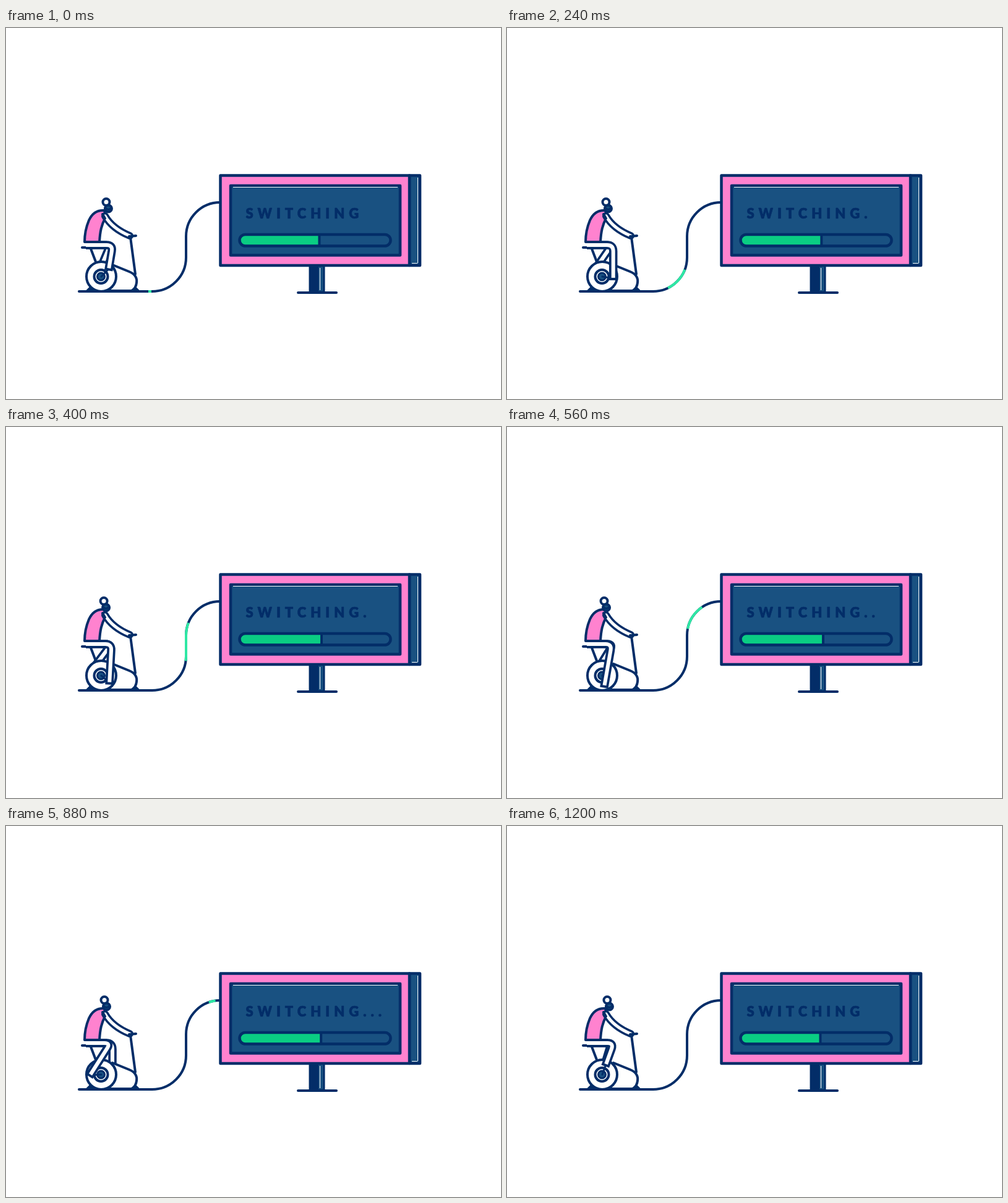
These frames come from a looping animation (800x600 px, 1.28 s). An HTML page:

```html
<!DOCTYPE html>
<html lang="en">
<head>
<meta charset="utf-8">
<title>Switching</title>
<style>
  html, body { margin: 0; width: 100%; height: 100%; overflow: hidden; }
  svg {
    --bg: #fff; --navy: #032d68; --deep: #195181; --pink: #ff82cf;
    display: block; width: 800px; height: 600px; background: var(--bg);
    fill: none; stroke: var(--navy); stroke-width: 4;
    stroke-linecap: round; stroke-linejoin: round;
  }
  svg.blue { --bg: #2e6ba9; }
  .bg { fill: var(--bg); }
  .deep { fill: var(--deep); }
  .pink { fill: var(--pink); }
  .navy { fill: var(--navy); }
  .limb { stroke-width: 13.5; }
  .skin { stroke: var(--bg); stroke-width: 6; }
  .arm { stroke-width: 12; }
  .arm + .skin { stroke-width: 5; }
  .flat { stroke-linecap: butt; }
  .board { stroke-width: 4.5; }
  .seam { stroke: var(--bg); stroke-width: 1; stroke-linecap: butt; }
  .blue .seam { opacity: .45; }
  text {
    font: 900 22px Lato, "Open Sans", sans-serif; letter-spacing: 7px;
    fill: var(--navy); stroke-width: .6;
  }
</style>
</head>
<body>
<svg id="stage" viewBox="0 0 800 600">
  <!-- cable -->
  <path d="M118 426H236A55 55 0 0 0 291 371V337A55 55 0 0 1 346 282"/>
  <path id="pulse" class="flat" stroke="#2ee8a4" d="M230 426H236A55 55 0 0 0 291 371V337A55 55 0 0 1 346 282"/>

  <!-- bike and rider -->
  <path d="M137 357L145 378"/>
  <g id="backLeg"><path class="limb flat"/><path class="skin flat"/></g>
  <path class="bg" d="M172 383L199 394C209 398 212 405 211 412Q210 421 203 425H144Z"/>
  <path d="M201 338L209 398"/>
  <circle class="bg" cx="154" cy="402" r="24"/>
  <path class="navy" stroke-width="2" d="M129 426L136 419L143 426ZM203 426L209 419L216 426Z"/>
  <circle class="bg" cx="153.5" cy="402" r="11"/>
  <circle class="deep" cx="153.5" cy="402" r="6" stroke-width="3"/>
  <path id="crank" stroke-width="3"/>
  <path d="M123 355H158"/>
  <g id="frontLeg"><path class="limb flat"/><path class="skin flat"/></g>
  <path class="pink" d="M159 295C147 294 139 300 134 311C129 323 127 336 127 346H151C152 329 154 319 161 306Z"/>
  <path class="arm" d="M160 304C168 318 183 329 200 336"/>
  <path class="skin" d="M160 304C168 318 183 329 200 336"/>
  <path d="M156 301L160 308M199 337L210 336"/>
  <g id="head">
    <circle class="bg" cx="162" cy="281.5" r="5.5"/>
    <circle class="deep" cx="165.5" cy="292" r="5.5"/>
    <path stroke-width="3" d="M160 291Q166 296 170 291"/>
  </g>

  <!-- billboard -->
  <path class="deep" d="M491 384H514V427H491Z" stroke-width="3"/>
  <path class="navy" stroke="none" d="M490 384H505V428H490Z"/>
  <path d="M472 428H534"/>
  <g class="board">
    <path class="deep" d="M652 238.500H669V384H652Z"/>
    <path class="pink" d="M346.500 238.500H652V384H346.500Z"/>
    <path class="deep" d="M363 255H637V367.500H363Z"/>
  </g>
  <path class="seam" d="M367 257.500H633M665.500 242V380M656 380.500H665M507.500 388V424"/>
  <text id="label" x="387.500" y="308">SWITCHING</text>
  <path id="fill" fill="#0acd83" stroke="none"/>
  <path id="edge" class="flat"/>
  <rect class="board" x="377.500" y="334" width="244" height="18.500" rx="9.250"/>
</svg>
<script>
const $ = id => document.getElementById(id);
const FRAME = 80, COUNT = 16, TURN = 2 * Math.PI;
const BLUE_STEP = 4;
const hub = [154, 402];
// [step, distance along the cable]
const tailKeys = [[0, 0], [2, 14], [3, 31], [4, 57], [5, 85], [7, 137], [9, 170], [11, 194], [14, 213], [16, 213]];
const tipKeys = [[0, 5], [2, 38], [3, 72], [4, 116], [5, 147], [7, 180], [9, 196], [11, 205], [14, 213], [16, 213]];

function sample(keys, k) {
  const i = keys.findIndex(p => p[0] > k);
  const [a, va] = keys[i - 1], [b, vb] = keys[i];
  return va + (vb - va) * (k - a) / (b - a);
}

function pedal(angle) {
  return [hub[0] + 18 * Math.cos(angle), hub[1] + 17 * Math.sin(angle)];
}

function drawLeg(leg, angle) {
  const [fx, fy] = pedal(angle);
  const kx = 170.5 + 1.5 * Math.cos(angle) - 1.5 * Math.sin(angle), ky = 351;
  const len = Math.hypot(fx - kx, fy - ky);
  const shin = d => `${kx + (fx - kx) / len * d} ${ky + (fy - ky) / len * d}`;
  const path = d => `M129 ${ky}H${kx - 10}Q${kx} ${ky} ${shin(10)}L${shin(d)}`;
  const [outline, skin] = leg.children;
  outline.setAttribute("d", path(len + 3));
  skin.setAttribute("d", path(len - 1));
}

function draw(k) {
  const swing = Math.cos(TURN * (k + 0.5) / COUNT);
  const angle = TURN * ((k - 3) / COUNT + (4 + 16 * Math.cos(TURN * k / COUNT)) / 360);
  $("stage").classList.toggle("blue", k === BLUE_STEP);

  drawLeg($("backLeg"), angle + Math.PI);
  drawLeg($("frontLeg"), angle);
  $("crank").setAttribute("d", `M${hub}L${pedal(angle)}`);
  $("head").setAttribute("transform", `translate(${2.5 * (swing - 1)} 0)`);

  const tail = sample(tailKeys, k), tip = sample(tipKeys, k);
  $("pulse").style.strokeDasharray = `0 ${tail} ${tip - tail} 999`;
  $("pulse").style.visibility = tip > tail ? "visible" : "hidden";

  const x = 508.7 - 2.3 * swing;
  $("fill").setAttribute("d", `M${x} 334H387A9 9 0 0 0 387 352H${x}Z`);
  $("edge").setAttribute("d", `M${x} 334V352`);
  const dots = k < 14 ? Math.floor((k + 2) / 4) : 0;
  $("label").textContent = "SWITCHING" + ".".repeat(dots);
}

const start = performance.now();
function tick(now) {
  draw(Math.floor(Math.max(0, now - start) / FRAME) % COUNT);
  requestAnimationFrame(tick);
}
draw(0);
requestAnimationFrame(tick);
</script>
</body>
</html>
```
